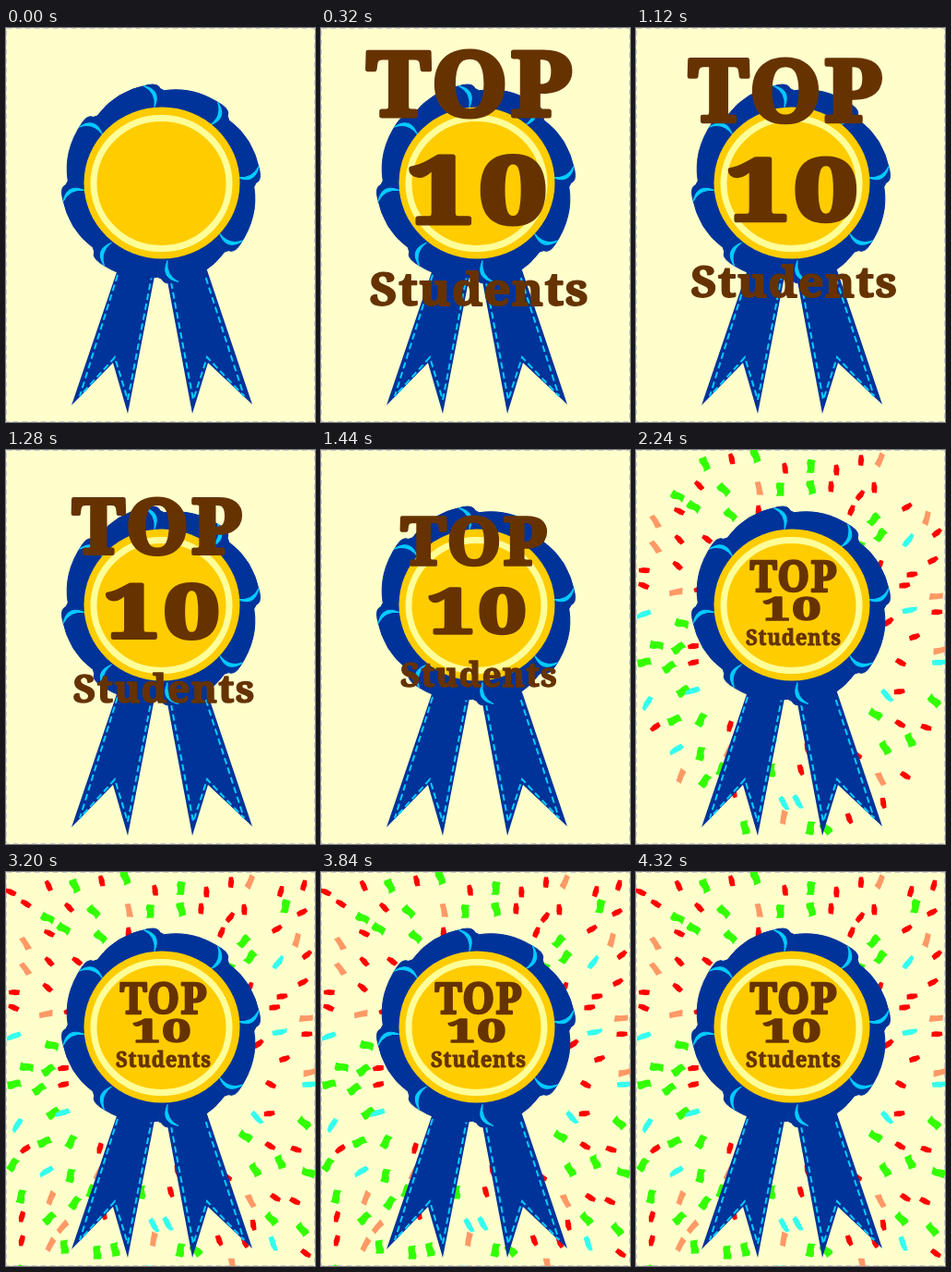
Recreate the animation shown at these times as an HTML page. Size 335 px wide and 426 px high, loop 4400 ms.

```html
<!DOCTYPE html>
<html lang="en">
<head>
<meta charset="utf-8">
<title>Top 10 Students</title>
<style>
  html, body { margin: 0; width: 100%; height: 100%; overflow: hidden; background: #ffc; }
  svg { display: block; width: 335px; height: 426px; }

  .confetti { animation: 4400ms step-end infinite; }
  #burst1 { animation-name: burst1; }
  #burst2 { animation-name: burst2; }
  #burst3 { animation-name: burst3; }
  @keyframes burst1 { 0% { opacity: 0 } 36.36%, 100% { opacity: 1 } }
  @keyframes burst2 { 0% { opacity: 0 } 50.9%, 100% { opacity: 1 } }
  @keyframes burst3 { 0% { opacity: 0 } 72.72%, 100% { opacity: 1 } }

  text {
    font-family: "Noto Serif", "Liberation Serif", serif;
    font-weight: 900;
    text-anchor: middle;
    fill: #630;
    stroke: #630;
    stroke-linejoin: round;
    transform-origin: 0 0;
    animation: shrink 4400ms infinite;
  }
  #top { font-size: 97px; letter-spacing: 3px; stroke-width: 5px;
    --from: translate(163px, 95px) scale(1.085, 1);
    --to: translate(171.5px, 153px) scale(.457, .47); }
  #ten { font-size: 100px; letter-spacing: 4px; stroke-width: 5px;
    --from: translate(171.5px, 211px) scale(1.31, 1);
    --to: translate(169.5px, 184px) scale(.55, .34); }
  #students { font-size: 51px; letter-spacing: 1.5px; stroke-width: 2px;
    --from: translate(172px, 300px) scale(1, .95);
    --to: translate(170.8px, 211px) scale(.435, .46); }

  /* hidden, then large, then ten steps down to the medal */
  @keyframes shrink {
    0% { visibility: hidden; transform: var(--from); animation-timing-function: step-end; }
    7.27% { visibility: visible; transform: var(--from); animation-timing-function: step-end; }
    23.63% { visibility: visible; transform: var(--from); animation-timing-function: steps(10, end); }
    41.81%, 100% { visibility: visible; transform: var(--to); }
  }
</style>
</head>
<body>
<svg viewBox="0 0 335 426">
  <rect width="335" height="426" fill="#ffc"/>
  <rect x=".5" y=".5" width="334" height="425" fill="none" stroke="#ccc" stroke-dasharray="6 4"/>

  <g id="burst1" class="confetti"></g>
  <g id="burst2" class="confetti"></g>
  <g id="burst3" class="confetti"></g>

  <g fill="#039">
    <path d="M122 258 L71 408 L116 362 L132 417 L163 258Z"/>
    <path d="M172 258 L202 417 L219 362 L267 407 L214 250Z"/>
  </g>
  <g fill="none" stroke="#0cf" stroke-width="2" stroke-dasharray="7 4">
    <path d="M121 267 L80 398 L118 356 L132 402 L158 268"/>
    <path d="M179 275 L203 402 L218 356 L258 398 L216 268"/>
  </g>
  <g id="petals" fill="#039" stroke="#039"></g>
  <g id="folds" fill="#0cf" stroke="#0cf" stroke-linejoin="round"></g>

  <ellipse cx="169" cy="167.5" rx="84.5" ry="82" fill="#fc0"/>
  <ellipse cx="168.5" cy="168" rx="73.5" ry="70.5" fill="none" stroke="#ff9" stroke-width="7"/>

  <text id="top">TOP</text>
  <text id="ten">10</text>
  <text id="students">Students</text>
</svg>
<script>
  const addPath = (id, d, x, y, angle, fill) => {
    const path = document.createElementNS('http://www.w3.org/2000/svg', 'path');
    path.setAttribute('d', d);
    path.setAttribute('transform', `translate(${x} ${y}) rotate(${angle})`);
    if (fill) path.setAttribute('fill', fill);
    document.getElementById(id).append(path);
  };

  // Rosette: one petal and its fold, turned eight times
  const petal = 'M0 0L-69-73.5Q-50-100-14-107Q-3-109-1-103L3-101Z';
  const fold = 'M-19-106Q1-102-7-83Q-5-99-19-106Z';
  for (let angle = 0; angle < 360; angle += 45) {
    addPath('petals', petal, 168, 168.5, angle);
    addPath('folds', fold, 168, 168.5, angle);
  }

  let seed = 7;
  const random = () => (seed = seed * 16807 % 2147483647) / 2147483647;
  const jitter = range => (random() * 2 - 1) * range;

  const red = { fill: '#f00', d: 'M-6-2l4-1 7 0 1 4-5 2-7 0z' };
  const green = { fill: '#3f0', d: 'M-8-4q4 2 8 0t7 0l0 8q-3-1-7 0t-7 0z' };
  const cyan = { fill: '#3fe', d: 'M-8-2l5-1 6 0 6 0-1 4-6 2-9 0z' };
  const orange = { fill: '#f96', d: 'M-7-3l7 0 7-1 0 6-6 1-9 1z' };
  const mix = [red, red, red, green, green, cyan, orange];

  // Confetti on a loose grid, pointing outwards; farther scraps join later bursts
  const cell = 28;
  for (let row = 0; row * cell < 426; row++) {
    for (let col = 0; col * cell < 335; col++) {
      const x = (col + .5) * cell + jitter(9);
      const y = (row + .5) * cell + jitter(9);
      const scrap = mix[Math.floor(random() * mix.length)];
      const tilt = Math.atan2(y - 200, x - 172) * 180 / Math.PI + jitter(30);
      const reach = Math.hypot((x - 172) / 140, (y - 200) / 170);
      if (reach < .72) continue;
      const burst = reach < 1.04 ? 1 : reach < 1.32 ? 2 : 3;
      addPath('burst' + burst, scrap.d, x, y, tilt, scrap.fill);
    }
  }
</script>
</body>
</html>
```
